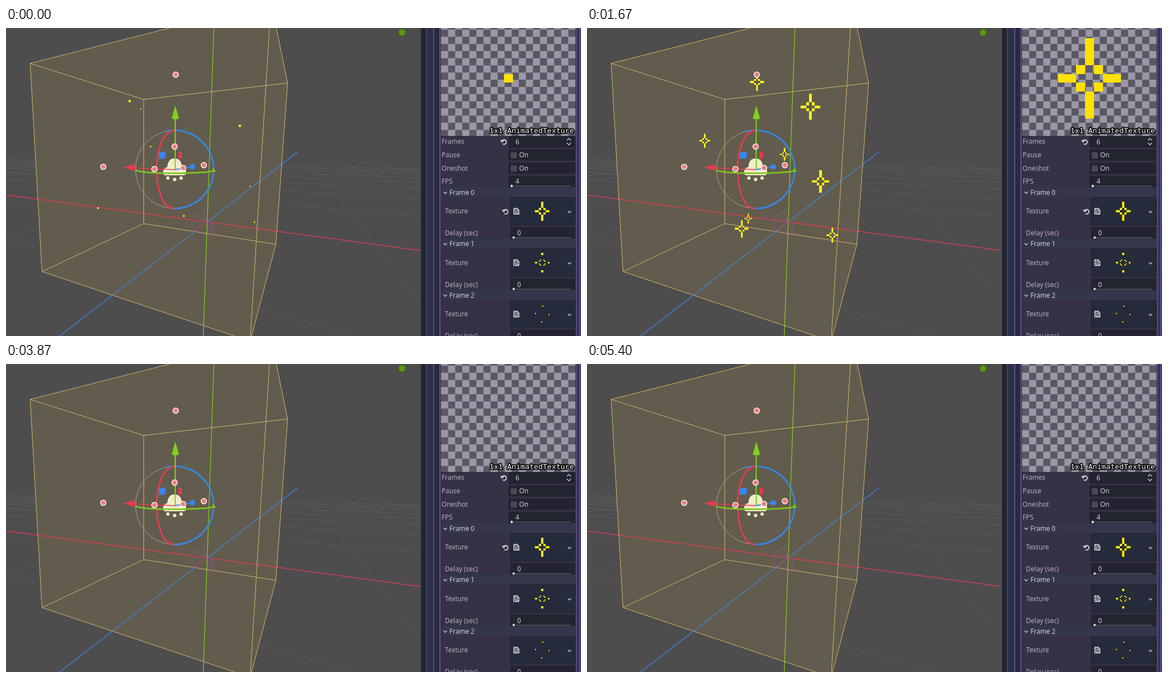
An HTML page for the animation above (5630 ms loop, 1023x548 px).

```html
<!DOCTYPE html>
<html lang="en">
<head>
<meta charset="utf-8">
<title>Animated texture particles</title>
<style>
html, body { margin: 0; width: 100%; height: 100%; overflow: hidden; background: #4d4d4d; }
svg { display: block; width: 100vw; height: 100vh; }
text { font: 11.7px "Noto Sans", sans-serif; fill: #b4b1bd; }
text.value { fill: #d3d3da; }
text.mono { font: 13.15px "DejaVu Sans Mono", monospace; fill: #fff; stroke: #000; stroke-width: 3.5; stroke-linejoin: round; paint-order: stroke; }
.line { fill: none; stroke-width: 1; }
.crisp { shape-rendering: crispEdges; }
</style>
</head>
<body>
<svg viewBox="0 0 1023 548" preserveAspectRatio="none">
  <defs>
    <pattern id="checker" x="774" y="-9.95" width="25.15" height="25.5" patternUnits="userSpaceOnUse">
      <path fill="#5a5767" d="M0 0h25.15v25.5H0z"/>
      <path fill="#9b98a4" d="M0 0h12.575v12.75H0zM12.575 12.75h12.575v12.75H12.575z"/>
    </pattern>
    <clipPath id="view"><path d="M0 0h737v548H0z"/></clipPath>
  </defs>

  <g clip-path="url(#view)">
    <path fill="#4d4d4d" d="M0 0h737v548H0z"/>
    <path id="grid" class="line" stroke="#fff" stroke-opacity=".07"/>
    <path id="hull" fill="#625c4e"/>
    <g id="axes" class="line"></g>
    <path id="edges" class="line" stroke="#d6b66c"/>
    <path class="line" stroke="#9a568f" stroke-opacity=".8" d="M334 331 367 347V370L334 362zM334 331 358 345 334 362M367 347 358 345 367 370M341 334 351 326 355 340"/>
    <path class="line" stroke="#f01e2c" stroke-width="1.5" d="M338 360 358 345"/>

    <g fill="#f3ebca">
      <path d="M279.500 258Q279 249 287 247.500Q288 232 300 232Q312 232 313 247.500Q321 249 320.500 258Q320 262 316 262H284Q280 262 279.500 258z"/>
      <circle cx="288" cy="267" r="3"/><circle cx="300" cy="269.500" r="3"/><circle cx="311.500" cy="267" r="3"/>
    </g>
    <path id="sparks" class="crisp" fill="#f9ee1c"/>

    <g fill="none">
      <circle cx="300" cy="251.500" r="69.500" stroke="#a8a496"/>
      <g stroke-width="2.800">
        <path stroke="#3688e6" d="M283 184A69.500 69.500 0 0 1 369.500 251.500A69.500 69.500 0 0 1 296 321"/>
        <path stroke="#ea3a50" d="M302 182C281 181 268 214 268 251C268 290 280 321 298 321"/>
        <path stroke="#80c61a" d="M230 253C246 260 344 260 371 254L368 250"/>
      </g>
      <path stroke="#ea3a50" stroke-width="1.500" d="M300 252 229 249"/>
      <path stroke="#3688e6" stroke-width="2" d="M300 252 331 247"/>
      <path stroke="#80d01a" stroke-width="2" d="M301 251V160"/>
    </g>
    <path fill="#80d01a" d="M301 138 295 161Q301 164 308 161z"/>
    <path fill="#ea3a50" d="M209 248 229 242.500V254.500zM307 221 313 220V231L307 233z"/>
    <path fill="#3688e6" d="M272 221 284 220V232L272 233z"/>
    <circle fill="#3688e6" cx="331.500" cy="247" r="5"/>
    <g id="handles" fill="#ef7d7d" stroke="#fff" stroke-width="1.400"></g>
    <circle cx="704.500" cy="8" r="6" fill="#5e9510" stroke="#41650f"/>
  </g>

  <path fill="#202431" d="M737 0h286v548H737z"/>
  <path fill="#41495f" d="M737 0h1.500v548h-1.500zM747 0h2v548h-2z"/>
  <path fill="#2b3046" d="M749 0h11v548h-11z"/>
  <path fill="#4c5592" d="M760 0h2v548h-2z"/>
  <path fill="#2a293d" d="M763 0h8v548h-8z"/>
  <path fill="#6d4a88" d="M771 0h2v548h-2z"/>
  <path fill="#363145" d="M773 0h241v548H773z"/>
  <path fill="#33345a" d="M1014 0h9v548h-9z"/>
  <path fill="#6d4a88" d="M1014 0h1.500v548h-1.500z"/>
  <path fill="#4c5592" d="M1020 0h2v548h-2z"/>
  <path fill="url(#checker)" d="M774 0h239v192H774z"/>
  <path id="preview" class="crisp" fill="#ffe100"/>
  <text class="mono" x="860" y="187">1x1 AnimatedTexture</text>
  <g id="panel"></g>
</svg>
<script>
const LOOP = 5630, STEP = 250, PHASE = 120, STALL = [830, 1670];
const LIFE = 1000, COUNT = 8, FALL = 0.035;
const $ = id => document.getElementById(id);
const setPath = (id, d) => $(id).setAttribute("d", d);

// Homogeneous 3D view: vectors are [x * depth, y * depth, depth].
const point = (x, y, depth) => [x * depth, y * depth, depth];
const add = (p, q, k = 1) => p.map((v, i) => v + q[i] * k);
const corner = point(245, 127, 1);
const toLeft = add(point(43, 63, 0.581), corner, -1);
const toRight = add(point(501, 98, 0.762), corner, -1);
const down = add(point(245, 348, 1.0674), corner, -1);
const origin = point(358, 345, 1);
const place = (base, a, b, c) => add(add(add(base, toLeft, a), toRight, b), down, c);
const flat = p => `${(p[0] / p[2]).toFixed(2)} ${(p[1] / p[2]).toFixed(2)}`;
const segment = (p, q) => `M${flat(p)}L${flat(q)}`;

function drawScene() {
  const cube = (a, b, c) => place(corner, a, b, c);
  let edges = "";
  for (const a of [0, 1]) for (const b of [0, 1])
    edges += segment(cube(0, a, b), cube(1, a, b)) + segment(cube(a, 0, b), cube(a, 1, b)) + segment(cube(a, b, 0), cube(a, b, 1));
  setPath("edges", edges);
  const outline = [cube(1, 0, 0), cube(1, 1, 0), cube(0, 1, 0), cube(0, 1, 1), cube(1, 1, 1), cube(1, 0, 1)];
  setPath("hull", `M${outline.map(flat).join("L")}z`);

  const ground = (a, b) => place(origin, a, b, 0);
  // Largest reach along one direction that stays in front of the camera.
  const near = (p, dir) => (0.08 - p[2]) / dir[2];
  let grid = "";
  for (let i = -8; i <= 3; i++) {
    const p = ground(0, i * 1.018), q = ground(i * 1.018, 0);
    if (p[2] > 0.1) grid += segment(add(p, toLeft, -12), add(p, toLeft, near(p, toLeft)));
    if (q[2] > 0.1) grid += segment(add(q, toRight, -20), add(q, toRight, near(q, toRight)));
  }
  setPath("grid", grid);
  $("axes").innerHTML = [["#e63950", ground(0, -40), ground(0, 3.6)], ["#3a87e0", ground(-60, 0), ground(2.1, 0)],
    ["#84c81c", place(origin, 0, 0, -2), place(origin, 0, 0, 2)]]
    .map(([color, p, q]) => stroke(segment(p, q), color, 1.3)).join("");
}

// Sprites are built from cells around the centre, mirrored both ways; 14 by 18 cells in all.
const mirror = (x, y, w, h = w) => [x, -x - w].flatMap(a => [y, -y - h].map(b => [a, b, w, h]));
const SPRITES = [
  [...mirror(-1, -9, 2, 6), ...mirror(-7, -1, 4, 2), ...mirror(1, 1, 2)],
  [...mirror(-1, -9, 2), ...mirror(-7, -1, 2), ...mirror(1, 2, 1), ...mirror(2, 1, 1)],
  [[0, -8], [-7, -1], [6, 0], [-1, 7]].map(([x, y]) => [x, y, 1, 1]),
  [],
  [[-1, -1, 1, 1]],
  [[-1, -1, 2, 2]]
];

const spritePath = (sprite, x, y, cell) => sprite.map(([a, b, w, h]) =>
  `M${(x + a * cell).toFixed(2)} ${(y + b * cell).toFixed(2)}h${w * cell}v${h * cell}h${-w * cell}z`).join("");

function spriteAt(t) {
  if (t >= STALL[0] && t < STALL[1]) return SPRITES[3];
  const n = SPRITES.length;
  return SPRITES[(Math.floor((t - PHASE) / STEP) + n) % n];
}

// Evenly scattered emission points inside the cube.
const scatter = (n, ratio) => ((0.5 + (n + COUNT) * ratio) % 1);

function draw(t) {
  const sprite = spriteAt(t), gap = LIFE / COUNT;
  const newest = Math.floor(t / gap);
  let d = "";
  for (let n = newest - COUNT + 1; n <= newest; n++) {
    const drop = FALL * (t - n * gap) / 1000;
    const [x, y, depth] = place(corner, scatter(n, 0.8192), scatter(n, 0.671), 0.05 + 0.9 * scatter(n, 0.5497) + drop);
    d += spritePath(sprite, x / depth, y / depth, 1 / depth);
  }
  setPath("sparks", d);
  setPath("preview", spritePath(sprite, 894, 89.5, 7.93));
}

// Static panel pieces.
const text = (x, y, s, cls = "") => `<text x="${x}" y="${y}" class="${cls}">${s}</text>`;
const rect = (x, y, w, h, fill, more = "") => `<rect x="${x}" y="${y}" width="${w}" height="${h}" fill="${fill}" ${more}/>`;
const stroke = (d, color = "#c9c8d0", w = 1.4) => `<path d="${d}" fill="none" stroke="${color}" stroke-width="${w}"/>`;
const field = (x, y, h) => rect(x, y, 1013 - x, h, "#22242f");
const slider = (x, y) => rect(x + 4, y, 1005 - x - 4, 1.5, "#565661") + rect(x, y - 1.5, 3.5, 4, "#e6e6ea");
const reload = (x, y) => stroke(`M${x - 2} ${y + 4}A4 4 0 1 0 ${x - 3} ${y - 1}M${x - 5} ${y - 3}l1.500 3.500 3.500-1.500`, "#e4e4e8", 1.6);
const chevron = (x, y) => stroke(`M${x - 3} ${y - 1.5}l3 3 3-3`);

function fileIcon(x, y) {
  let s = stroke(`M${x - 4.5} ${y - 5}h6l3 3v7h-9z`, "#e4e4e8", 1.3);
  for (let i = 0; i < 8; i++) s += rect(x - 3.5 + (i % 2) * 3.6 + (i >> 1) % 2 * 1.8, y - 3.5 + (i >> 1) * 2, 1.8, 1.8, "#e4e4e8");
  return s;
}

function group(i) {
  const y = 283 + i * 91.5;
  return rect(776, y, 237, 18, "#34364a") + chevron(781.5, y + 10) + text(789, y + 13.7, "Frame " + i, "value") +
    text(781, y + 47, "Texture") + (i ? "" : reload(888.5, y + 43)) +
    rect(897.5, y + 18.5, 115, 49, "#262b3b", 'stroke="#1d202c"') + fileIcon(908, y + 43) +
    `<path class="crisp" fill="#ffee00" d="${spritePath(SPRITES[i], 954, y + 43, 1.9)}"/>` + chevron(1002.5, y + 44) +
    text(781, y + 86, "Delay (sec)") + field(897, y + 71, 21) + text(909.5, y + 86, "0", "value") + slider(901.5, y + 89.5);
}

const toggle = (y, label) => text(775, y + 4, label) + field(894, y - 10, 20) +
  rect(898, y - 5, 11, 11, "#4a4955", 'rx="1.500"') + text(913, y + 4, "On", "value");

$("panel").innerHTML =
  text(775, 206, "Frames") + reload(885.5, 202) + field(894, 192, 21) + text(906.5, 206.5, "6", "value") +
  stroke("M998 200l3.500-3.500 3.500 3.500M998 204.500l3.500 3.500 3.500-3.500") +
  toggle(226, "Pause") + toggle(249.5, "Oneshot") +
  text(775, 277, "FPS") + field(894, 263, 20) + text(906.5, 277, "4", "value") + slider(898, 280.5) +
  [0, 1, 2].map(group).join("");

$("handles").innerHTML = [[302, 83], [173, 247], [300, 211], [264, 251], [352, 244], [315, 249]]
  .map(([x, y]) => `<circle cx="${x}" cy="${y}" r="4.800"/>`).join("");

drawScene();
const start = performance.now();
function tick() {
  draw((performance.now() - start) % LOOP);
  requestAnimationFrame(tick);
}
tick();
</script>
</body>
</html>
```
